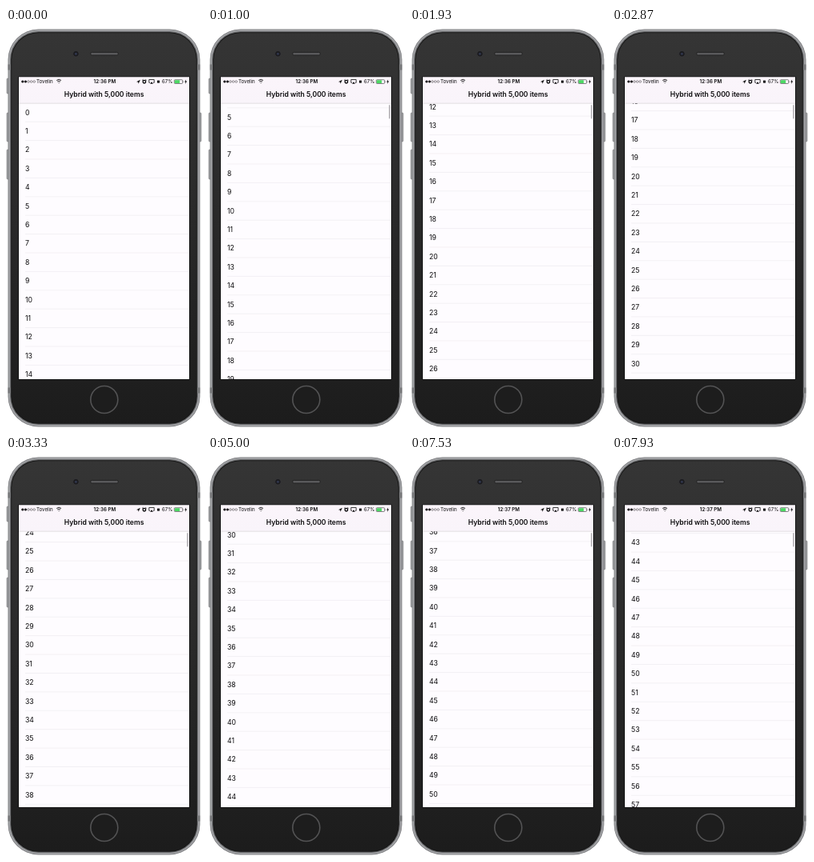
An HTML page that plays this animation: 245x500 px, repeating every 8 s.

```html
<!DOCTYPE html>
<html lang="en">
<head>
<meta charset="utf-8">
<title>Phone list scrolling</title>
<style>
  html, body { margin: 0; width: 100%; height: 100%; overflow: hidden; background: #fff; }
  svg { display: block; width: 100vw; height: 100vh; }
  text { font-family: Inter, Roboto, sans-serif; fill: #0b0a0c; }
  .status { font-size: 6.2px; }
  .strong { font-weight: 600; }
  .row { font-size: 8.7px; }
</style>
</head>
<body>
<svg viewBox="0 0 245 500" xmlns="http://www.w3.org/2000/svg">
  <defs>
    <clipPath id="listArea"><rect x="16" y="94" width="213" height="345"/></clipPath>
    <linearGradient id="glass" x2="0" y2="1">
      <stop offset="0" stop-color="#353535"/>
      <stop offset=".5" stop-color="#292929"/>
      <stop offset="1" stop-color="#1c1c1c"/>
    </linearGradient>
    <linearGradient id="bar" x2="0" y2="1">
      <stop offset="0" stop-color="#fbf5fb"/>
      <stop offset="1" stop-color="#f9f4fa"/>
    </linearGradient>
  </defs>

  <!-- Phone body and side buttons -->
  <g fill="#a3a4a6" stroke="#77787a" stroke-width=".6">
    <rect x="1" y="63" width="3" height="19" rx="1"/>
    <rect x="1" y="106" width="3" height="36" rx="1"/>
    <rect x="1" y="152" width="3" height="37" rx="1"/>
    <rect x="241" y="106" width="3" height="36" rx="1"/>
  </g>
  <rect x="2.5" y="1.5" width="240" height="497" rx="38" fill="#77787b"/>
  <rect x="3.3" y="2.3" width="238.4" height="495.4" rx="37.2" fill="#a2a3a6"/>
  <rect x="5" y="4" width="235" height="492" rx="35.5" fill="#6a6b6d"/>
  <path d="M2.5 49h4M238.5 49h4M2.5 453h4M238.5 453h4" stroke="#77787a" stroke-width="7"/>
  <rect x="6.2" y="5.2" width="232.6" height="489.6" rx="34.3" fill="#161616"/>
  <rect x="7.2" y="6.2" width="230.6" height="487.6" rx="33.3" fill="url(#glass)"/>
  <circle cx="87.4" cy="32.2" r="3.8" fill="#1b1b1e" stroke="#414143" stroke-width=".6"/>
  <circle cx="87.4" cy="32.2" r="1.5" fill="#30364c"/>
  <rect x="105.7" y="30.4" width="34.6" height="3.6" rx="1.8" fill="#59595b" stroke="#1b1b1b" stroke-width=".8"/>
  <circle cx="122.8" cy="464.5" r="17" fill="#1d1d1d" stroke="#535354" stroke-width="1.6"/>

  <!-- Screen -->
  <rect x="15.2" y="60.7" width="214.6" height="379.1" fill="#101011"/>
  <rect x="16" y="61.5" width="213" height="377.5" fill="#fefcff"/>
  <g clip-path="url(#listArea)"><g id="rows"></g></g>
  <rect id="indicator" x="226" y="96" width="1.8" height="17.5" rx=".9" fill="#bcb9bd"/>
  <rect x="16" y="61.5" width="213" height="32.5" fill="url(#bar)"/>
  <path d="M16 94.2h213" stroke="#d0ccd1" stroke-width=".6"/>
  <text class="strong" x="122.6" y="86.2" font-size="8.6" text-anchor="middle">Hybrid with 5,000 items</text>

  <!-- Status bar -->
  <g id="signal" stroke="#0b0a0c" stroke-width=".4"></g>
  <text class="status" x="38" y="69.2">Tovelin</text>
  <g fill="none" stroke="#0b0a0c">
    <path d="M63.2 65.5q2.9-2.6 5.8 0M64.3 67q1.8-1.5 3.6 0" stroke-width=".9"/>
    <path d="M65.3 68.2h1.6l-.8 1z" fill="#0b0a0c" stroke="none"/>
  </g>
  <text class="status strong" id="clock" x="123.4" y="69.2" text-anchor="middle"></text>
  <path d="M163 67.2l4.8-2.5-2.2 5-.4-2.3z"/>
  <g fill="none" stroke="#0b0a0c">
    <circle cx="172.9" cy="67.2" r="1.8" stroke-width="1.3"/>
    <path d="M170.2 65.4l1.2-1.1M175.6 65.4l-1.2-1.1" stroke-width=".9"/>
    <path d="M180 68.3h-1.2v-3.8h6.4v3.8H184" stroke-width=".8"/>
    <path d="M180 69.8l2-2.6 2 2.6z" fill="#0b0a0c" stroke="none"/>
    <rect x="210.3" y="64.7" width="10.4" height="4.8" rx="1" stroke-width=".5"/>
  </g>
  <rect x="189" y="65.6" width="3" height="3" fill="#0b0a0c"/>
  <text class="status" x="208.4" y="69.2" text-anchor="end">67%</text>
  <rect x="210.9" y="65.3" width="6.3" height="3.6" rx=".5" fill="#4cd964"/>
  <path d="M221.2 66.2q1 .9 0 1.8z"/>
  <path d="M225.2 64.3l-2 3.1h1.4l-.6 2.5 2.2-3.3h-1.5z"/>
</svg>
<script>
const LOOP = 8000, STEP = 1000 / 15;
const ROW_HEIGHT = 23.4, FIRST_ROW_Y = 105.5;
const byId = id => document.getElementById(id);
const clamp = v => Math.max(0, Math.min(1, v));

function add(parent, tag, attributes, content = '') {
  const node = document.createElementNS('http://www.w3.org/2000/svg', tag);
  for (const name in attributes) node.setAttribute(name, attributes[name]);
  node.textContent = content;
  parent.append(node);
}

for (let i = 0; i < 5; i++) {
  add(byId('signal'), 'circle', { cx: 20.8 + i * 3.6, cy: 67, r: 1.35, fill: i < 2 ? '#0b0a0c' : 'none' });
}
for (let i = 0; i < 62; i++) {
  const y = FIRST_ROW_Y + i * ROW_HEIGHT;
  add(byId('rows'), 'text', { class: 'row', x: 24, y: y + 3.1 }, i);
  add(byId('rows'), 'path', { d: `M24 ${y + 11.7}h205`, stroke: '#ebe8ed', 'stroke-width': 0.6 });
}

// An accelerating finger drag followed by a decelerating glide.
function fling(t, start, dragTime, dragDistance, glideTime, glideDistance, power) {
  const drag = clamp((t - start) / dragTime);
  const glide = clamp((t - start - dragTime) / glideTime);
  return dragDistance * drag ** 2 + glideDistance * (1 - (1 - glide) ** power);
}

function scrollOffset(t) {
  if (t >= 7330) return 832 + fling(t, 7333, 467, 113, 1070, 177.2, 3);
  if (t >= 5930) return 832;
  if (t >= 4130) return 709;
  return fling(t, 533, 467, 111, 1070, 177.2, 3) + fling(t, 2467, 400, 100, 666, 201, 2);
}

function indicatorOpacity(t) {
  if (t >= 7400) return clamp((t - 7330) / 130);
  if (t >= 5930) return clamp((6070 - t) / 140);
  return Math.min(clamp((t - 533) / 130), clamp((4270 - t) / 140));
}

function draw(now) {
  // The screen updates 15 times a second.
  const t = Math.floor((now % LOOP + 5) / STEP) * STEP;
  byId('rows').setAttribute('transform', `translate(0 ${-scrollOffset(t)})`);
  byId('indicator').setAttribute('opacity', indicatorOpacity(t));
  byId('clock').textContent = t < 6260 ? '12:36 PM' : '12:37 PM';
  requestAnimationFrame(draw);
}
draw(performance.now());
</script>
</body>
</html>
```
